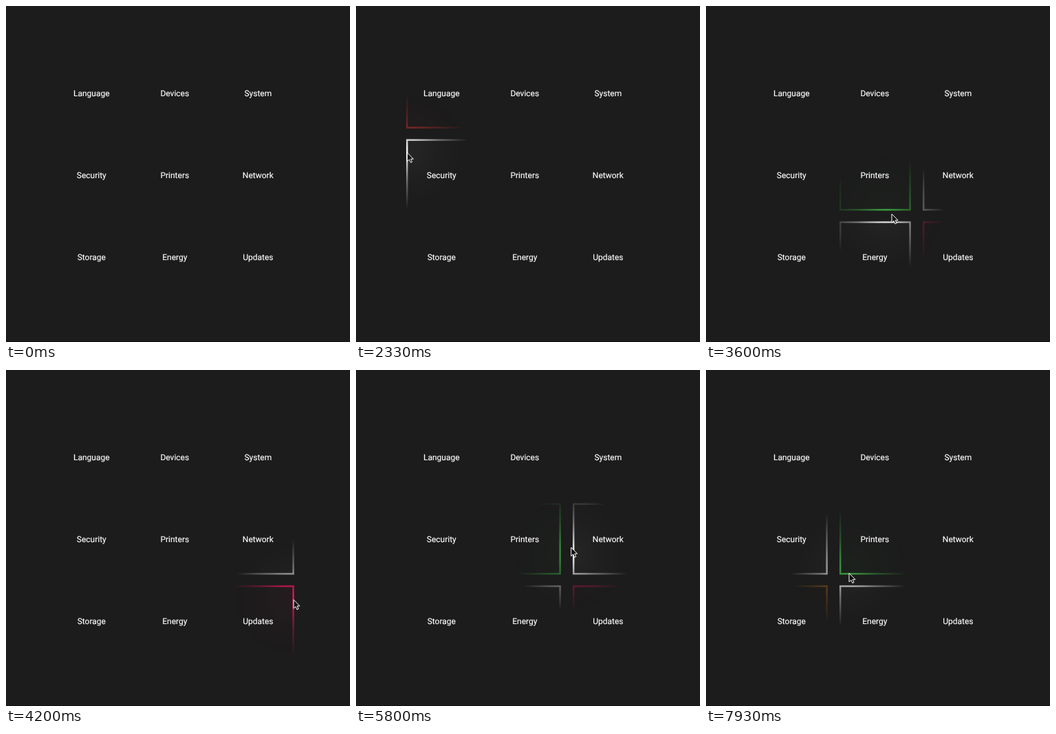
An HTML page that plays this animation: 500 by 488 pixels, repeating every 8000 ms.

```html
<!DOCTYPE html>
<html lang="en">
<head>
<meta charset="utf-8">
<title>Settings grid with reveal highlight</title>
<style>
  html, body { margin: 0; height: 100%; overflow: hidden; background: #1c1c1c; }
  svg { display: block; width: 100vw; height: 100vh; }
  text { font: 12px Roboto, sans-serif; fill: #fff; stroke: #fff; stroke-width: .15px; text-anchor: middle; text-rendering: geometricPrecision; }
</style>
</head>
<body>
<svg viewBox="0 0 500 488">
  <defs>
    <radialGradient id="falloff">
      <stop offset="0" stop-color="#fff"/>
      <stop offset=".2" stop-color="#fff" stop-opacity=".75"/>
      <stop offset=".5" stop-color="#fff" stop-opacity=".38"/>
      <stop offset="1" stop-color="#fff" stop-opacity="0"/>
    </radialGradient>
    <mask id="reveal" maskUnits="userSpaceOnUse" x="0" y="0" width="500" height="488">
      <circle id="light" r="86" fill="url(#falloff)"/>
    </mask>
  </defs>
  <rect width="500" height="488" fill="#1c1c1c"/>
  <rect y="487" width="500" height="1" fill="#121212"/>
  <g id="tiles" mask="url(#reveal)" stroke-width="2.5" fill-opacity=".045"></g>
  <g id="labels"></g>
  <g id="cursor">
    <path d="M0 0V12.6L2.9 10L4.9 14.4L7.1 13.4L5.1 9.2H9Z"
          fill="#111" stroke="#fff" stroke-linejoin="round"/>
  </g>
</svg>
<script>
const LOOP = 8000, FPS = 15, START = 866, LIGHT_LAG = 36;

const tiles = [
  ["Language", "#c83030"], ["Devices", "#fff"], ["System", "#0f75cb"],
  ["Security", "#fff"], ["Printers", "#3fa945"], ["Network", "#fff"],
  ["Storage", "#b5681a"], ["Energy", "#fff"], ["Updates", "#e3175a"],
];

// Key points of the pointer's sweep: time in ms, x, y
const path = [
  [866, 484, 236], [1533, 242, 180], [1800, 162, 185], [2333, 74.5, 213],
  [2700, 80, 273], [3222, 174, 306], [3600, 270, 302], [4260, 423, 338],
  [5000, 342, 406], [5640, 318, 292], [6300, 296, 148], [6666, 276, 110],
  [6850, 246, 104], [7300, 213, 168], [7933, 208, 295],
];

const byId = id => document.getElementById(id);

function add(parent, tag, attributes, content = "") {
  const node = document.createElementNS("http://www.w3.org/2000/svg", tag);
  for (const name in attributes) node.setAttribute(name, attributes[name]);
  node.textContent = content;
  byId(parent).append(node);
}

tiles.forEach(([label, color], i) => {
  const x = 74.2 + 121 * (i % 3), y = 75.2 + 119.4 * Math.floor(i / 3);
  add("tiles", "rect", { x, y, width: 101.4, height: 101.4, fill: color, stroke: color });
  add("labels", "text", { x: x + 50.1, y: y + 55.3 }, label);
});

function slope(i, axis) {
  const a = path[Math.max(i - 1, 0)], b = path[Math.min(i + 1, path.length - 1)];
  return (b[axis] - a[axis]) / (b[0] - a[0]);
}

// Smooth cubic through the key points
function pointAt(time) {
  let i = 0;
  while (i < path.length - 2 && path[i + 1][0] <= time) i++;
  const a = path[i], b = path[i + 1], span = b[0] - a[0];
  const u = (time - a[0]) / span, v = 1 - u;
  return [1, 2].map(axis =>
    a[axis] * v * v * (1 + 2 * u) + b[axis] * u * u * (1 + 2 * v) +
    span * u * v * (slope(i, axis) * v - slope(i + 1, axis) * u));
}

function place(id, time) {
  byId(id).setAttribute("transform", `translate(${pointAt(time)})`);
}

function draw() {
  const step = Math.floor((performance.now() % LOOP + 7) * FPS / 1000);
  const time = step * 1000 / FPS;
  const visible = time >= START ? "visible" : "hidden";
  byId("tiles").style.visibility = byId("cursor").style.visibility = visible;
  if (time >= START) {
    place("cursor", time);
    place("light", time - LIGHT_LAG);
  }
  requestAnimationFrame(draw);
}
draw();
</script>
</body>
</html>
```
